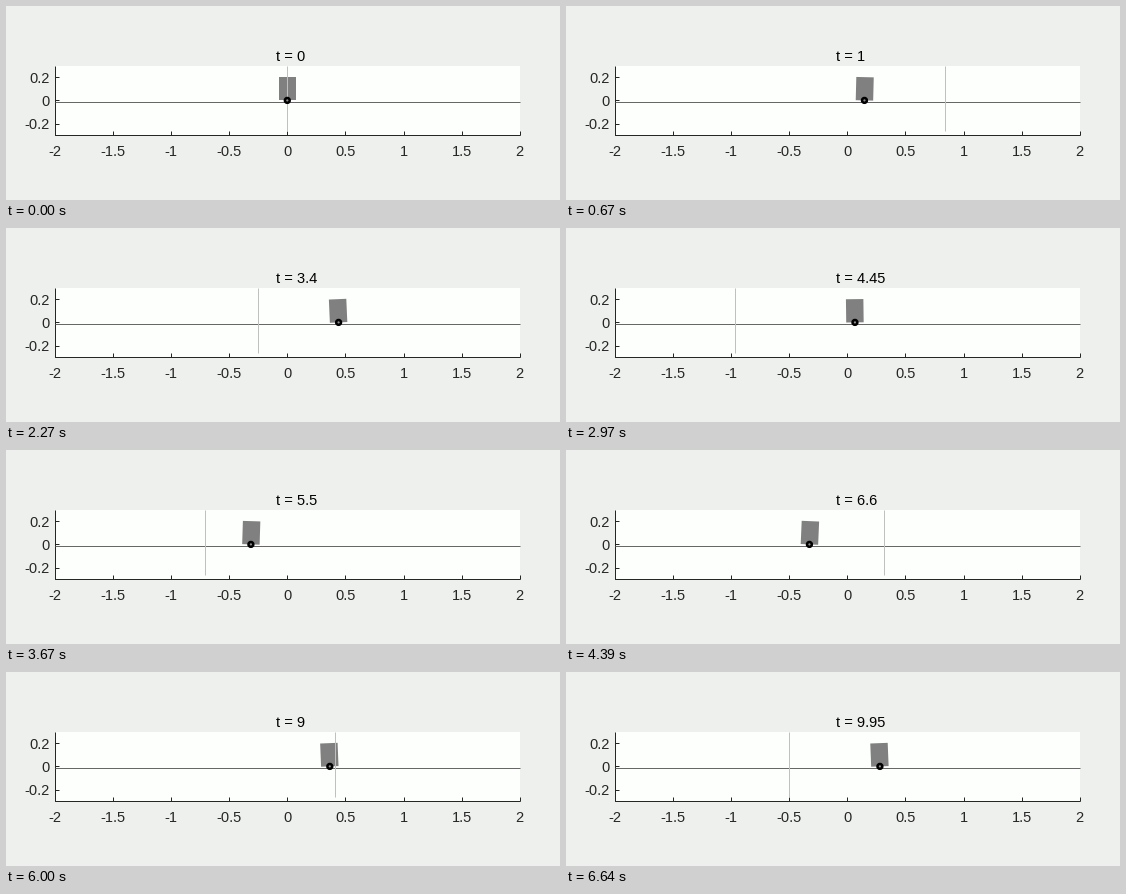
Recreate the animation shown at these times as a matplotlib script. Size 554 by 194 pixels, loop 6670 ms.

```python
import numpy as np
import matplotlib.pyplot as plt
from matplotlib.animation import FuncAnimation
from matplotlib.patches import Circle, Polygon, Rectangle

W, H, DPI = 554, 194, 100
LOOP_MS, TICK_MS = 6670, 10
STEPS, DT = 200, 0.05
SCALE, X0, Y0 = 116.25, 281.3, 94.4
PT = 72 / DPI
INK = "#262626"

# The cart follows sin(t) with a smaller swing and a lag
SWING, LAG, SETTLE = 0.375, 1.37, 5.5
HALF, TALL = 0.075, 0.2


def px(x):
    return X0 + SCALE * x


def py(y):
    return Y0 - SCALE * y


def position(t):
    """Lagging swing plus a start offset that dies out."""
    offset = SWING * np.sin(LAG) * max(0, 1 - t / SETTLE) ** 1.3
    return SWING * np.sin(t - LAG) + offset


def lean(t):
    """Clockwise tilt in radians, starting upright."""
    return -0.045 * np.sin(t - 1.6) * (1 - np.exp(-4 * t))


plt.rcParams["font.family"] = "Liberation Sans"
fig = plt.figure(figsize=(W / DPI, H / DPI), dpi=DPI, facecolor="#eef0ed")
ax = fig.add_axes([0, 0, 1, 1])
ax.set(xlim=(0, W), ylim=(H, 0))
ax.axis("off")


def line(xs, ys, color=INK, z=2):
    return ax.plot(xs, ys, color=color, lw=PT, zorder=z,
                   solid_capstyle="butt")[0]


def label(x, y, text, ha, color=INK):
    return ax.text(x, y, text, ha=ha, va="baseline", fontsize=14.6 * PT, color=color)


left, right, top, bottom = px(-2), px(2), py(0.3), py(-0.3)
ax.add_patch(Rectangle((left, top), right - left, bottom - top,
                       fc="#fdfffc", ec="none", zorder=0))
line([left, left, right], [top, bottom, bottom])
for v in np.arange(-2, 2.5, 0.5):
    line([px(v)] * 2, [bottom, bottom - 4.6])
    label(px(v), 150, f"{v:g}", "center")
for v in (-0.2, 0, 0.2):
    line([left, left + 4.6], [py(v)] * 2)
    label(43.3, py(v) + 5.5, f"{v:g}", "right")
line([left, right], [py(-0.017)] * 2, "#666766")

title = label(269.6, 55, "", "left", "black")
body = ax.add_patch(Polygon([(0, 0)] * 4, fc="#7f807f", ec="none", zorder=3))
target = line([0, 0], [top, py(-0.26)], "#bfc1bf", z=4)
wheel = ax.add_patch(Circle((0, py(0)), 2.4, fc="#8c8c8c", ec="black",
                            lw=2.5 * PT, zorder=5))
CORNERS = np.array([(-HALF, 0), (-HALF, TALL), (HALF, TALL), (HALF, 0)])


def draw(frame):
    step = min(int(frame * TICK_MS * 0.03 + 0.45), STEPS - 1)
    t = step * DT
    x, a = position(t), lean(t)
    c, s = np.cos(a), np.sin(a)
    pts = CORNERS @ np.array([[c, -s], [s, c]])
    body.set_xy(np.column_stack([px(x + pts[:, 0]), py(pts[:, 1])]))
    wheel.center = px(x), py(0)
    target.set_xdata([px(np.sin(t))] * 2)
    title.set_text(f"t = {round(t, 2):g}")
    return body, wheel, target, title


anim = FuncAnimation(fig, draw, frames=LOOP_MS // TICK_MS, interval=TICK_MS,
                     repeat=True, repeat_delay=0)
plt.show()
```
